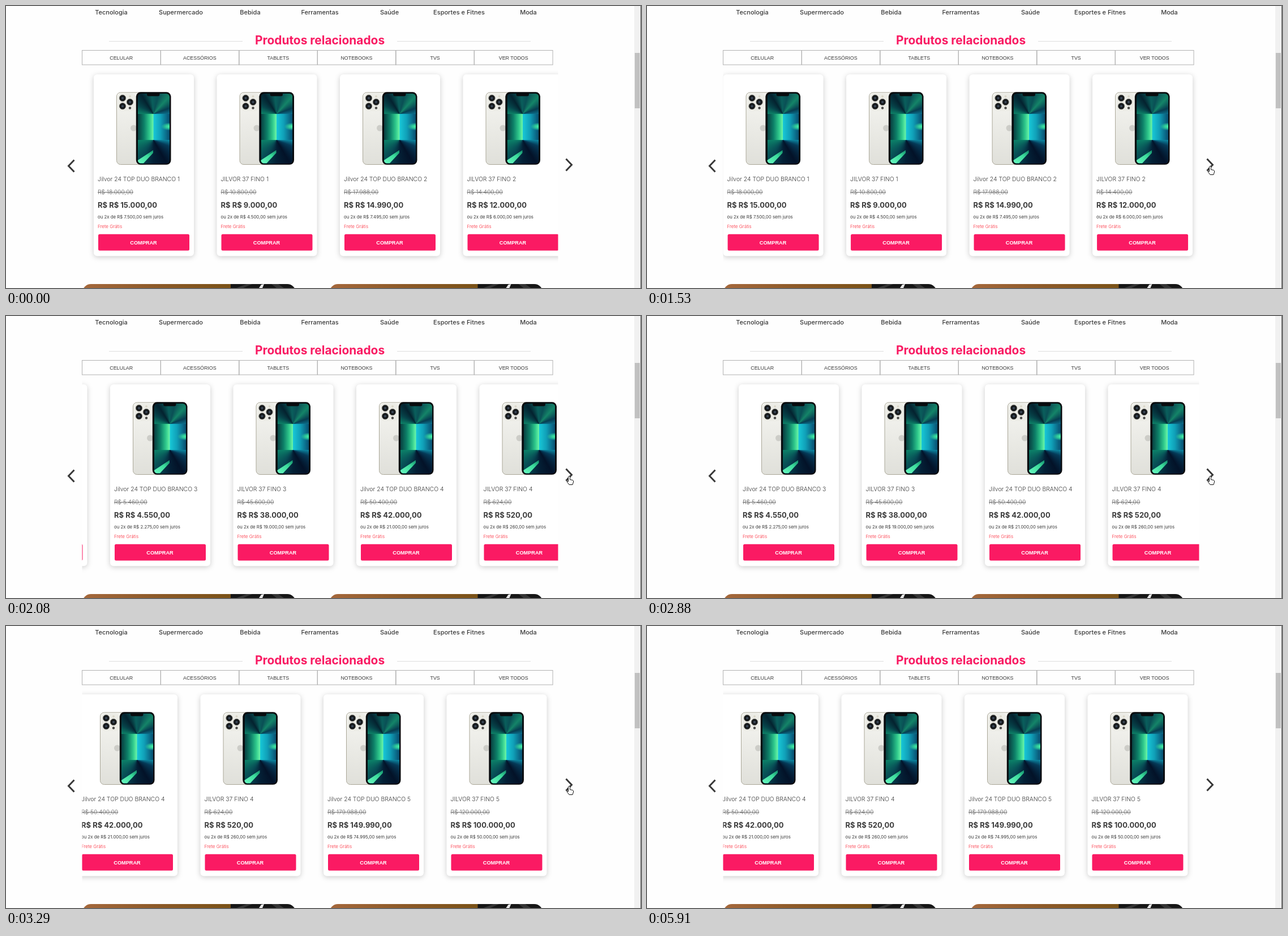
Write an HTML page that moves like this. It is 1122 px wide and 499 px high and loops after 5.98 s.

```html
<!DOCTYPE html>
<html lang="pt-BR">
<head>
<meta charset="utf-8">
<style>
html, body { margin: 0; width: 100%; height: 100%; overflow: hidden; background: #fefefe; }
svg { display: block; width: 1122px; height: 499px; }
text { font-family: Inter, sans-serif; fill: #3a3a3a; }
.mid { text-anchor: middle; }
.nav { font-size: 11px; font-weight: 500; }
.head { font-size: 20.9px; font-weight: 700; fill: #f91a62; }
.tab { font: 8.85px "Liberation Sans", Arial, sans-serif; }
.name { font-size: 10.4px; font-weight: 300; }
.old { font-size: 10.3px; font-weight: 300; fill: #666; text-decoration: line-through; }
.price { font-size: 13px; font-weight: 700; }
.parts { font-size: 7.8px; }
.free { font-size: 8.1px; font-weight: 300; fill: #fb2a3a; }
.buy { font: bold 9.2px "Liberation Sans", Arial, sans-serif; fill: #fff; }
.card { fill: #fff; filter: drop-shadow(0 2px 5px rgba(0,0,0,.2)); }
.chevron { fill: none; stroke: #383838; stroke-width: 3; }
.screen {
  height: 124px; border-radius: 6px;
  background:
    radial-gradient(15px 7px at 100% 47%, #4bf0a4, #2cc79a 45%, transparent),
    linear-gradient(90deg, #083f40, #0d8068 40%, #2fc98c 75%, #6cf7a8) 0 36px / 27.5px 46px,
    linear-gradient(90deg, #18c9d8, #10a0b8 45%, #084e70) 27.5px 36px / 29px 46px,
    conic-gradient(from -90deg at 27.5px 36px, #0c8066, #06444a 30deg, #04222f 58deg, #0a5f5c 85deg,
      #0a4f55 105deg, #148468 132deg, #063c50 160deg, #0b6c88 180deg) 0 0 / 100% 36px,
    conic-gradient(from 90deg at 27.5px 0, #0c86a0, #053a58 22deg, #031228 60deg, #042036 90deg,
      #074a54 125deg, #0c8068 180deg) 0 82px / 100% 42px;
  background-repeat: no-repeat;
}
#cursor path { fill: #fff; stroke: #111; stroke-width: 1; stroke-linejoin: round; }
</style>
</head>
<body>
<svg viewBox="0 0 1122 499">
  <defs>
    <clipPath id="view"><rect x="134.5" y="105" width="841" height="360"/></clipPath>
    <linearGradient id="shell" x2="0" y2="1"><stop stop-color="#f5f5f1"/><stop offset="1" stop-color="#e0e0da"/></linearGradient>
    <linearGradient id="beam" x1="0" y1="1" x2="1" y2="0"><stop stop-color="#6af7c0"/><stop offset=".6" stop-color="#3cdc9c"/><stop offset="1" stop-color="#14906c"/></linearGradient>
    <linearGradient id="wood"><stop stop-color="#a5683c"/><stop offset=".5" stop-color="#8d5a28"/><stop offset="1" stop-color="#7a5217"/></linearGradient>
    <g id="phones">
      <rect x="40.5" y="153" width="55" height="127.5" rx="7" fill="url(#shell)" stroke="#aaa798"/>
      <rect x="42.5" y="155" width="32" height="31" rx="7" fill="#ecece6"/>
      <g fill="#16191c" stroke="#77756c" stroke-width=".8">
        <circle cx="51" cy="163" r="5.7"/><circle cx="51" cy="177.2" r="5.7"/><circle cx="64" cy="170" r="5.7"/>
      </g>
      <g fill="#3b4858"><circle cx="51" cy="163" r="2"/><circle cx="51" cy="177.2" r="2"/><circle cx="64" cy="170" r="2"/></g>
      <circle cx="64" cy="160" r="2" fill="#dcd8ca"/>
      <circle cx="64" cy="180.5" r="2.2" fill="#4a4a48"/>
      <circle cx="70.5" cy="216" r="5.5" fill="#cdcdc8"/>
      <rect x="74.8" y="152.3" width="61.7" height="128.5" rx="8" fill="#080b0e"/>
    </g>
    <g id="glass">
      <path d="M77.8 273L105 255V260L88 278.3H82Q78 277 77.8 273Z" fill="url(#beam)"/>
      <rect x="94" y="153.5" width="22.5" height="6" rx="3" fill="#080b0e"/>
    </g>
    <g id="banner">
      <clipPath id="round"><rect y="492" width="377" height="60" rx="15"/></clipPath>
      <g clip-path="url(#round)">
        <rect y="492" width="263" height="9" fill="url(#wood)"/>
        <rect x="262" y="492" width="115" height="9" fill="#161616"/>
        <path d="M272 499L290 492H300L284 499ZM334 492H346L356 499H343Z" fill="#343434"/>
        <path d="M312 499L316 493L321 492L318 499Z" fill="#e8e8e8"/>
      </g>
    </g>
  </defs>

  <g id="page"></g>
  <g clip-path="url(#view)"><g id="track"></g></g>
  <path class="chevron" d="M120.5 272.5L110.5 283L120.5 293.5M989.5 270.5L999.5 281L989.5 291.5"/>
  <use href="#banner" x="135"/>
  <use href="#banner" x="571.5"/>
  <rect x="1110" width="11" height="499" fill="#f1f1f1"/>
  <rect x="1111" y="83" width="9" height="98" fill="#c1c1c1"/>
  <rect x="1121" width="1" height="499" fill="#686868"/>
  <g id="cursor">
    <path id="arrow" d="M0 0V13L3 10.3L5 15L7 14L5 9.7H9Z"/>
    <path id="hand" d="M-1.5 1.5Q0 -1 1.5 1.5V6.5L6.5 7.5Q8 8.5 7.5 11L6 15.5H0L-4 10Q-4 8 -1.5 10Z"/>
  </g>
</svg>
<script>
const LOOP = 5980, STEP = 68, PITCH = 217.5;
const $ = id => document.getElementById(id);
const text = (cls, x, y, s) => `<text class="${cls}" x="${x}" y="${y}">${s}</text>`;
const money = n => "R$ " + n.toLocaleString("de-DE", { minimumFractionDigits: 2 });

// Static page
const nav = [["Tecnologia", 186], ["Supermercado", 309], ["Bebida", 431.5], ["Ferramentas", 554.5],
  ["Saúde", 677.5], ["Esportes e Fitnes", 800.5], ["Moda", 923]];
const tabs = ["CELULAR", "ACESSÓRIOS", "TABLETS", "NOTEBOOKS", "TVS", "VER TODOS"];
$("page").innerHTML =
  nav.map(([s, x]) => text("nav mid", x, 15, s)).join("") +
  text("head mid", 554.5, 68, "Produtos relacionados") +
  `<path d="M182 62.5H418M691 62.5H927" stroke="#dedede"/>` +
  tabs.map((s, i) => {
    const x = 135 + i * 138.6;
    return `<rect x="${Math.round(x) - .5}" y="78.5" width="138.6" height="25.5" fill="none" stroke="#b2b2b2"/>` +
      text("tab mid", x + 68.7, 94.5, s);
  }).join("");

// Product cards
const prices = [15000, 9000, 14990, 12000, 4550, 38000, 42000, 520, 149990, 100000];
$("track").innerHTML = prices.map((p, i) => {
  const model = i % 2 ? "JILVOR 37 FINO" : "Jilvor 24 TOP DUO BRANCO";
  return `<g transform="translate(${155 + i * PITCH})">
    <rect class="card" y="121" width="177" height="321.5" rx="6"/>
    <use href="#phones"/>
    <foreignObject x="77.5" y="154.5" width="56.5" height="124"><div class="screen"></div></foreignObject>
    <use href="#glass"/>` +
    text("name", 7, 309.5, `${model} ${(i >> 1) + 1}`) +
    text("old", 7, 333, money(Math.round(p * 1.2))) +
    text("price", 7, 357, "R$ " + money(p)) +
    text("parts", 7, 376, `ou 2x de ${money(p / 2)} sem juros`) +
    text("free", 7, 393, "Frete Grátis") +
    `<rect x="8" y="403.7" width="161" height="29" rx="2.5" fill="#fa1a63"/>` +
    text("buy mid", 88, 421.7, "COMPRAR") + "</g>";
}).join("");

// cubic-bezier(.42, 0, .58, 1), solved by bisection
function ease(x) {
  if (x <= 0 || x >= 1) return x <= 0 ? 0 : 1;
  let lo = 0, hi = 1, s;
  for (let i = 0; i < 20; i++) {
    s = (lo + hi) / 2;
    const at = 1.26 * s * (1 - s) ** 2 + 1.74 * s * s * (1 - s) + s ** 3;
    if (at < x) lo = s; else hi = s;
  }
  return s * s * (3 - 2 * s);
}

const held = (t, from) => from + Math.floor((t - from) / STEP) * STEP;
const scrollAt = t =>
  841 * ease((held(t, 1460) - 1461) / 605) + 493 * ease((held(t, 2740) - 2806) / 470);

// start time, number of steps, end point
const moves = [[330, 5, 1015, 272], [740, 5, 995, 283], [4500, 4, 1068, 280], [5170, 7, 1086, 495]];
function cursorAt(t) {
  let x = 1080, y = 520;
  for (const [start, steps, toX, toY] of moves) {
    if (t < start) break;
    const n = Math.min(steps, Math.floor((t - start) / STEP) + 1);
    const p = Math.sin(n / steps * Math.PI / 2);
    x += (toX - x) * p;
    y += (toY - y) * p;
  }
  return [x, y];
}

function draw(now) {
  const t = now % LOOP;
  const [x, y] = cursorAt(t);
  const over = x < 1003;
  $("track").setAttribute("transform", `translate(${-scrollAt(t)})`);
  $("cursor").setAttribute("transform", `translate(${x} ${y})`);
  $("cursor").style.display = t >= 330 && t < 5710 ? "" : "none";
  $("hand").style.display = over ? "" : "none";
  $("arrow").style.display = over ? "none" : "";
  requestAnimationFrame(draw);
}
draw(0);
</script>
</body>
</html>
```
